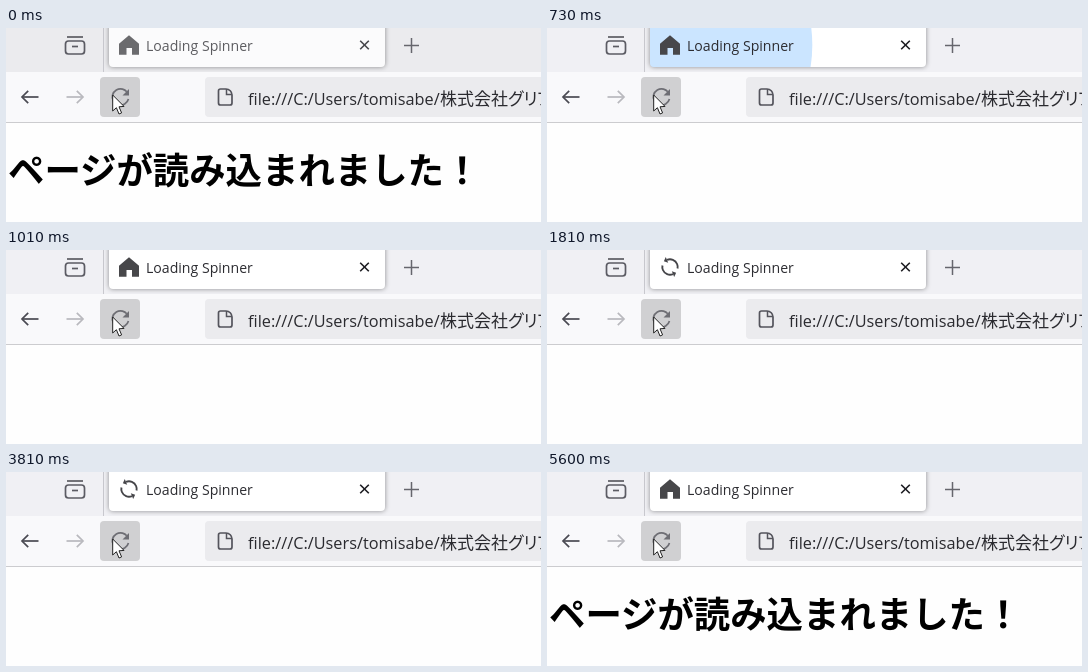
An HTML page with a canvas that plays this animation: 535x194 px, repeating every 6400 ms.

```html
<!DOCTYPE html>
<html lang="ja">
<head>
<meta charset="utf-8">
<title>Loading Spinner</title>
<style>
  html, body { margin: 0; width: 100%; height: 100%; overflow: hidden; background: #fefefe; }
  canvas, svg { position: absolute; left: 0; top: 0; width: 535px; height: 194px; }
  text { font-family: "Open Sans", "Noto Sans CJK JP", "Noto Sans CJK", sans-serif; fill: #2a2a2f; }
  #title { font-size: 14.1px; }
  .url { font-size: 16.3px; }
  .ja { font: 350 17px "Noto Sans CJK JP", "Noto Sans CJK", sans-serif; font-feature-settings: "palt"; }
  #heading { font: bold 36.4px "Noto Sans CJK JP", "Noto Sans CJK", sans-serif; fill: #000; }
</style>
</head>
<body>
<canvas id="stage" width="535" height="194"></canvas>
<svg viewBox="0 0 535 194">
  <text id="title" x="140" y="23">Loading Spinner</text>
  <text class="url" x="242" y="76.5">file:///C:/Users/tomisabe/</text>
  <text class="ja" x="434" y="77">株式会社グリフ</text>
  <text id="heading" x="2" y="156">ページが読み込まれました！</text>
</svg>
<script>
const LOOP = 6400;
const STEPS = [0, 460, 530, 600, 660, 730, 800, 870, 940, 1010];
const TOGGLES = [1810, 2270, 2800, 3280, 3810, 4340, 4800, 5330];
const ICON = { x: 123, y: 17 };

// window colours without and with focus
const BLURRED = { strip: '#ebebee', tab: '#fbfbfc', close: '#46464a', house: '#6b6b6e', title: '#5c5c60' };
const FOCUSED = { strip: '#f0f0f4', tab: '#fff', close: '#1b1b20', house: '#47474a', title: '#2c2c31' };

const ctx = document.getElementById('stage').getContext('2d');
const title = document.getElementById('title');
const heading = document.getElementById('heading');

function rect(x, y, w, h, color, radius = 0) {
  ctx.beginPath();
  ctx.roundRect(x, y, w, h, radius);
  ctx.fillStyle = color;
  ctx.fill();
}

function trace(points, close) {
  ctx.beginPath();
  points.forEach(([x, y]) => ctx.lineTo(x, y));
  if (close) ctx.closePath();
}

function line(points, color, width, close) {
  trace(points, close);
  ctx.strokeStyle = color;
  ctx.lineWidth = width;
  ctx.stroke();
}

function shape(points, color) {
  trace(points, true);
  ctx.fillStyle = color;
  ctx.fill();
}

function disc(x, y, r, color) {
  ctx.beginPath();
  ctx.arc(x, y, r, 0, 2 * Math.PI);
  ctx.fillStyle = color;
  ctx.fill();
}

function arrow(x, dir, color) {
  line([[x, 69], [x + 16.5 * dir, 69]], color, 1.7);
  line([[x + 6.2 * dir, 62.8], [x, 69], [x + 6.2 * dir, 75.2]], color, 1.7);
}

function drawStrip(theme) {
  rect(0, 0, 535, 44, theme.strip);
  rect(97, 0, 1, 44, '#c8c8ce');

  // tab overview
  const c = '#5b5b63';
  line([[61, 9], [77, 9]], c, 1.7);
  ctx.beginPath();
  ctx.roundRect(59.5, 13, 19, 13, 3);
  ctx.stroke();
  line([[66, 18.5], [72, 18.5]], c, 1.7);

  ctx.save();
  ctx.shadowColor = 'rgba(0,0,0,.42)';
  ctx.shadowBlur = 5;
  rect(103, -10, 276, 49, theme.tab, 4);
  ctx.restore();

  line([[354.2, 12.7], [362.8, 21.3]], theme.close, 1.6);
  line([[362.8, 12.7], [354.2, 21.3]], theme.close, 1.6);
  line([[398, 17.5], [413, 17.5]], '#66666d', 1.5);
  line([[405.5, 10], [405.5, 25]], '#66666d', 1.5);
}

function drawReload() {
  const c = '#6e6e74';
  rect(94, 49, 40, 40, '#d0d0d2', 4);
  ctx.beginPath();
  ctx.arc(114.5, 69, 8.2, 0.25, -0.7);
  ctx.strokeStyle = c;
  ctx.lineWidth = 1.7;
  ctx.stroke();
  shape([[123, 61], [123, 67.5], [116.5, 67.5]], c);
}

function drawCursor() {
  const points = [[106.7, 67], [106.7, 83], [110.4, 79.7], [113, 86],
    [115.6, 84.9], [113, 78.8], [118, 78.4]];
  shape(points, '#fff');
  line(points, '#222', 1, true);
}

function drawPage() {
  const c = '#54545c';
  ctx.beginPath();
  ctx.roundRect(212.5, 61, 13.5, 16, [2, 6, 2, 2]);
  ctx.strokeStyle = c;
  ctx.lineWidth = 1.7;
  ctx.stroke();
  line([[220.5, 61], [220.5, 66.5], [226, 66.5]], c, 1.5);
}

function drawToolbar() {
  rect(0, 44, 535, 50, '#f9f9fb');
  rect(0, 94, 535, 1, '#cccccf');
  arrow(16, 1, '#4a4a52');
  arrow(77, -1, '#b9b9be');
  drawReload();
  rect(199, 49, 350, 40, '#ebebee', 4);
  drawPage();
  drawCursor();
}

function drawHouse(color) {
  shape([[123, 7.3], [133, 15.8], [133, 26.8], [126, 26.8], [126, 20],
    [120.5, 20], [120.5, 26.8], [113, 26.8], [113, 15.8]], color);
}

function drawSync() {
  const c = '#454549';
  ctx.save();
  ctx.translate(ICON.x, ICON.y);
  ctx.rotate(-0.4);
  for (let i = 0; i < 2; i++) {
    ctx.beginPath();
    ctx.arc(0, 0, 7.7, -Math.PI / 2, 0.6);
    ctx.strokeStyle = c;
    ctx.lineWidth = 1.9;
    ctx.stroke();
    shape([[0, -10.8], [-3.4, -7.7], [0, -4.6]], c);
    ctx.rotate(Math.PI);
  }
  ctx.restore();
}

function drawBurst(t) {
  const k = Math.min(1, (t - 638) / 375);
  if (k <= 0 || k > 0.98) return;
  const p = 1 - (1 - k) ** 2;
  ctx.save();
  ctx.beginPath();
  ctx.roundRect(103, -10, 276, 49, 4);
  ctx.clip();
  disc(ICON.x, ICON.y, 8 + 312 * p, `rgba(10,132,255,${0.37 * (1 - p)})`);
  ctx.restore();
}

function render(time) {
  const t = time < 1010 ? STEPS.findLast(s => s <= time) : time;
  const theme = t < 460 ? BLURRED : FOCUSED;
  const loading = t >= 460 && t < 660;
  const toggled = TOGGLES.filter(s => s <= t).length % 2;

  rect(0, 0, 535, 194, '#fefefe');
  drawStrip(theme);
  drawToolbar();
  drawBurst(t);

  if (loading) disc(117.5 + 12 * (t - 460) / 140, 17, 2.7, '#58585c');
  else if (toggled) drawSync();
  else drawHouse(theme.house);

  title.style.fill = theme.title;
  heading.style.visibility = t < 530 || t >= 5600 ? 'visible' : 'hidden';
}

const start = performance.now();
function tick() {
  render((performance.now() - start) % LOOP);
  requestAnimationFrame(tick);
}
tick();
</script>
</body>
</html>
```
